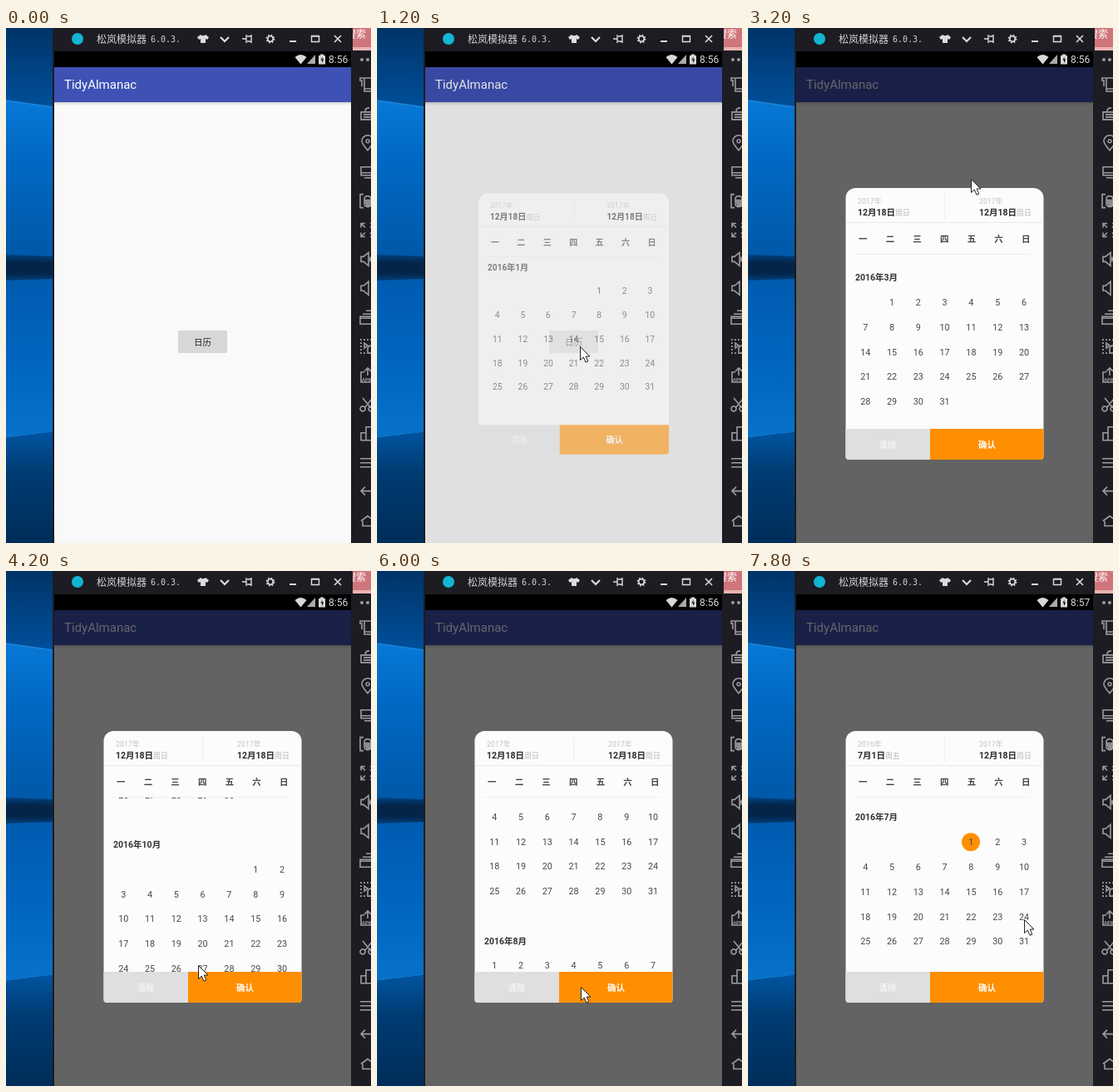
Write an HTML page that moves like this. It is 439 by 618 pixels and loops after 8 s.

```html
<!DOCTYPE html>
<html lang="zh">
<head>
<meta charset="utf-8">
<style>
html, body { margin: 0; width: 100%; height: 100%; overflow: hidden; background: #1c1c22; }
svg { display: block; width: 439px; height: 618px; font-family: Roboto, "Noto Sans CJK SC", "Noto Sans CJK", sans-serif; }
.mid { text-anchor: middle; }
.bold { font-weight: 700; }
.line { fill: none; stroke-width: 1.6; }
</style>
</head>
<body>
<svg viewBox="0 0 439 618">
  <defs>
    <linearGradient id="sky" x2="0" y2="1"><stop stop-color="#003468"/><stop offset="1" stop-color="#004f9a"/></linearGradient>
    <linearGradient id="upper" x2="0" y2="1"><stop stop-color="#0878d6"/><stop offset=".4" stop-color="#0068c2"/><stop offset="1" stop-color="#0058a8"/></linearGradient>
    <linearGradient id="gap" x2="0" y2="1"><stop stop-color="#00427f"/><stop offset=".3" stop-color="#04254a"/><stop offset=".7" stop-color="#04254a"/><stop offset="1" stop-color="#00427f"/></linearGradient>
    <linearGradient id="lower" x2="0" y2="1"><stop stop-color="#005bb0"/><stop offset=".6" stop-color="#0067c0"/><stop offset="1" stop-color="#0872ca"/></linearGradient>
    <linearGradient id="floor" x2="0" y2="1"><stop stop-color="#0054a0"/><stop offset=".35" stop-color="#003c74"/><stop offset="1" stop-color="#002d59"/></linearGradient>
    <linearGradient id="shade" x2="0" y2="1"><stop stop-opacity=".16"/><stop offset="1" stop-opacity="0"/></linearGradient>
    <clipPath id="listClip"><rect x="118" y="272" width="238" height="209"/></clipPath>
  </defs>

  <g id="wallpaper">
    <path fill="url(#sky)" d="M0 0H57V95L0 87z"/>
    <path fill="url(#upper)" d="M0 87L57 95V276L0 274z"/>
    <path fill="url(#gap)" d="M0 272L57 274V302L0 304z"/>
    <path fill="url(#lower)" d="M0 303L57 301V485L0 492z"/>
    <path fill="url(#floor)" d="M0 492L57 485V618H0z"/>
    <path stroke="#1c86dc" stroke-width="1.5" d="M0 87L57 95"/>
  </g>

  <rect x="56" width="383" height="618" fill="#1c1c22"/>
  <circle cx="86" cy="13" r="7" fill="#12b5d2"/>
  <text x="109" y="17.5" font-size="12" fill="#d4d4d6">松岚模拟器</text>
  <text x="174" y="17" font-size="10" fill="#d4d4d6" font-family="DejaVu Sans Mono, monospace">6.0.3.</text>
  <g class="line" stroke="#dcdcde">
    <path fill="#dcdcde" stroke="none" d="M234 8q3 2.5 6 0l4 3-2 3-2-1v5h-6v-5l-2 1-2-3z"/>
    <path stroke-width="2.2" d="M258 11l5 5 5-5"/>
    <path stroke-width="1.4" d="M284 13h5M289 8v10M290 10h3l2-1v8l-2-1h-3"/>
    <circle cx="318" cy="13" r="3.2"/>
    <circle cx="318" cy="13" r="4.6" stroke-dasharray="1.8 1.81"/>
    <path stroke-width="2" d="M341 16h8"/>
    <path stroke-width="1.4" d="M367.500 9.500h9v7h-9zM367 10h10"/>
    <path d="M395 9l8 8M403 9l-8 8"/>
  </g>

  <rect x="58" y="28" width="357" height="19"/>
  <g fill="#d8d8d8">
    <path d="M347.500 35q7-6 14 0l-7 8.500z"/>
    <path d="M362 43h10V32z" fill="#aaa"/>
    <path d="M376 33h2v-1.500h4V33h2v10.500h-8z"/>
    <path d="M380.500 34.500l-2 4h1.500v3.500l2.300-4.500h-1.800z" fill="#111"/>
    <text id="clock" x="388" y="42" font-size="12"></text>
  </g>

  <rect x="58" y="47" width="357" height="571" fill="#f9f9f9"/>
  <rect x="58" y="89" width="357" height="4" fill="url(#shade)"/>
  <rect x="58" y="47" width="357" height="42" fill="#3f51b5"/>
  <text x="70" y="73" font-size="15" fill="#fff">TidyAlmanac</text>
  <rect id="button" x="207" y="363" width="59" height="27" rx="1"/>
  <text class="mid" x="236.500" y="380.500" font-size="10.500" fill="#222">日历</text>
  <rect id="dim" x="58" y="47" width="357" height="571"/>

  <g id="dialog">
    <path fill="#fcfcfc" d="M117.500 204a12 12 0 0 1 12-12H343.500a12 12 0 0 1 12 12V514a4 4 0 0 1-4 4H121.500a4 4 0 0 1-4-4z"/>
    <path fill="#dfdfdf" d="M117.500 481H219v37H121.500a4 4 0 0 1-4-4z"/>
    <path fill="#ff8f00" d="M219 481H355.500v33a4 4 0 0 1-4 4H219z"/>
    <g class="mid" font-size="10.500" fill="#fff"><text x="168" y="504">清除</text><text x="287.500" y="504" class="bold">确认</text></g>
    <path stroke="#e8e8e8" d="M118 233.500H355.500"/>
    <path stroke="#f0f0f0" d="M236.500 199V230M128 271.500H340"/>
    <g id="start"></g>
    <g id="end"></g>
    <g id="weekdays" class="mid bold" font-size="10.500" fill="#444"></g>
    <g clip-path="url(#listClip)"><g id="list" font-size="10.800" fill="#484848"></g></g>
  </g>

  <rect x="417" width="22" height="27" fill="#cf757b"/>
  <path fill="#e9b4b2" d="M417 23h22v4h-22z"/>
  <text x="409" y="12" font-size="12" fill="#fff">搜索</text>
  <rect x="408" width="9" height="28" fill="#1c1c22"/>
  <g fill="#9c9ca0"><circle cx="428" cy="38" r="2"/><circle cx="435" cy="38" r="2"/></g>
  <g id="sidebar" class="line" stroke="#9c9ca0"></g>

  <path id="cursor" d="M.5.5V16.500L4.300 13 7 19.200 9.800 18 7.200 12H12z" fill="#fff" stroke="#222"/>
</svg>
<script>
const $ = id => document.getElementById(id);
const LOOP = 8000, TICK = 100;
const MONTH_H = 208.5, ROW_H = 29.8, COL_W = 31.8;

const progress = (t, from, to) => Math.min(1, Math.max(0, (t - from) / (to - from)));
const easeOut = (p, power) => 1 - (1 - p) ** power;
const smooth = p => p * p * (3 - 2 * p);
const glide = (a, b, p) => a.map((v, i) => v + (b[i] - v) * smooth(p));

// Half an ellipse: left of the start, over the top, down on the right.
function wander(p) {
  const angle = (67 + 273 * smooth(p)) * Math.PI / 180;
  return [226.5 + 44.5 * Math.cos(angle), 332 + 51 * Math.sin(angle)];
}

// Repeated pulls downwards, each a little longer than the one before.
function pull(t) {
  const turns = (t - 3900) / 900, n = Math.floor(turns);
  const y = 300 + (200 + 15 * n) * Math.sin(Math.PI * (turns - n));
  return [231 + 7 * n, Math.min(505, y)];
}

function cursorAt(t) {
  if (t < 1700) return glide([314, 414], [244, 382], progress(t, 0, 800));
  if (t >= 3900) {
    const picked = glide(pull(Math.min(t, 6100)), [267, 322], progress(t, 6100, 6500));
    return glide(picked, [332, 418], progress(t, 7000, 7500));
  }
  const low = glide(wander(progress(t, 1700, 2500)), [251, 402], progress(t, 2600, 2900));
  const high = glide(low, [268, 181], progress(t, 3000, 3200));
  return glide(high, [231, 300], progress(t, 3300, 3900));
}

// One long fling forward, then three shorter ones back.
function scrollAt(t) {
  const fling = (from, to, distance, power) => distance * easeOut(progress(t, from, to), power);
  return fling(3100, 3900, 2090, 1.6) - fling(4000, 4800, 445, 3) -
    fling(4900, 5700, 240, 3) - fling(5800, 6500, 165, 3);
}

function monthMarkup(m) {
  const lead = (new Date(2016, m, 1).getDay() + 6) % 7;
  const count = new Date(2016, m + 1, 0).getDate();
  const top = 284.5 + m * MONTH_H;
  let out = `<text class="bold" x="129" y="${top + 3.7}" font-size="10.5" fill="#333">2016年${m + 1}月</text>`;
  if (m === 6) out += `<circle id="picked" cx="268" cy="${top + ROW_H}" r="11" fill="#ff8f00"/>`;
  for (let d = 1; d <= count; d++) {
    const cell = lead + d - 1;
    const x = 141.2 + cell % 7 * COL_W, y = top + (Math.floor(cell / 7) + 1) * ROW_H + 3.8;
    out += `<text class="mid" x="${x}" y="${y}">${d}</text>`;
  }
  return out;
}

const dateMarkup = (x, year, date, day) =>
  `<text x="${x}" y="211" font-size="8.8" fill="#c2c2c2">${year}年</text>` +
  `<text x="${x}" y="225" font-size="10.5" fill="#2c2c2c" class="bold">${date}<tspan font-size="8.8" font-weight="400" fill="#b4b4b4">${day}</tspan></text>`;

const sideIcons = [
  'M5-8H17V8H5zM5 5h12M0-4v-4h4M2-6v8',
  'M1-2h16V7H1zM4 1h10M4 4h10M6-3q0-4 5-4',
  'M9 9C5 4 2 1 2-2A7 7 0 0 1 16-2C16 1 13 4 9 9zM9-4a2 2 0 1 0 .1 0',
  'M1-6h16V4H1zM1 1h16M5 7h9',
  'M4-8H0V8h4M5-2q0-4 4-4t4 4v5q0 4-4 4t-4-4zM5-1h9M6 1h8M6 3h8M7 5h8',
  'M1-3v-5h5M1-8l5 5M1 3v5h5M1 8l5-5M17-3v-5h-5M17-8l-5 5M17 3v5h-5M17 8l-5-5',
  'M1-3h3l6-5V8L4 3H1zM12-3v6M15 0h-4',
  'M1-3h3l6-5V8L4 3H1z',
  'M0-1h14V8H0zM0 1h14M3-4h12M7-8h9',
  'M0-8h2m2 0h2m2 0h2m2 0h2M0-4h2M0 0h2M0 4h2M0 8h2m2 0h2M5-4l4 3-4 3zM9 8V3a4 4 0 0 1 8 0v5z',
  'M5-4H1V8h15V-4M9 0v-8M5-5l4-4 4 4',
  'M3-8L13 4M15-8L6 3M3 2a3 3 0 1 0 .1 0M13 2a3 3 0 1 0 .1 0',
  'M1-1h6V8H1zM7 8V-8h8V8z',
  'M0-5h16M0 0h16M0 5h16',
  'M6-6L1-1l5 5M1-1h11q4 0 4 6',
  'M1 0l8-6 8 6M3 0v6h13'
];

function build() {
  $('weekdays').innerHTML = [...'一二三四五六日']
    .map((c, i) => `<text x="${138.3 + i * 32.65}" y="257">${c}</text>`).join('');
  $('list').innerHTML = Array.from({ length: 12 }, (_, m) => monthMarkup(m)).join('');
  $('end').innerHTML = dateMarkup(278, 2017, '12月18日', '周日');
  $('sidebar').innerHTML =
    sideIcons.map((d, i) => `<path transform="translate(426 ${68 + 34.9 * i})" d="${d}"/>`).join('') +
    '<text x="428" y="424" font-size="6" fill="#9c9ca0" stroke="none" class="bold">APK</text>';
}

let shownPick = null;
function showPick(picked) {
  if (picked === shownPick) return;
  shownPick = picked;
  $('picked').setAttribute('visibility', picked ? 'inherit' : 'hidden');
  $('start').innerHTML = picked ? dateMarkup(132, 2016, '7月1日', '周五') : dateMarkup(132, 2017, '12月18日', '周日');
}

function render(ms) {
  const t = Math.floor(ms % LOOP / TICK) * TICK;
  const [x, y] = cursorAt(t);
  $('cursor').setAttribute('transform', `translate(${Math.round(x)} ${Math.round(y)})`);
  $('cursor').setAttribute('visibility', t >= 100 ? 'visible' : 'hidden');

  const opening = progress(t, 1100, 1400), shown = easeOut(opening, 2);
  $('dim').setAttribute('opacity', .6 * opening ** 1.63);
  $('dialog').setAttribute('opacity', shown);
  $('dialog').setAttribute('transform', `translate(236.5 355) scale(${.915 + .085 * shown}) translate(-236.5 -355)`);
  $('button').setAttribute('fill', t >= 900 && t < 1200 ? '#c6c7c7' : '#d6d7d7');

  $('list').setAttribute('transform', `translate(0 ${-scrollAt(t)})`);
  showPick(t >= 6900);
  $('clock').textContent = t >= 7700 ? '8:57' : '8:56';
}

build();
const begin = performance.now();
function loop() {
  render(performance.now() - begin);
  requestAnimationFrame(loop);
}
loop();
</script>
</body>
</html>
```
